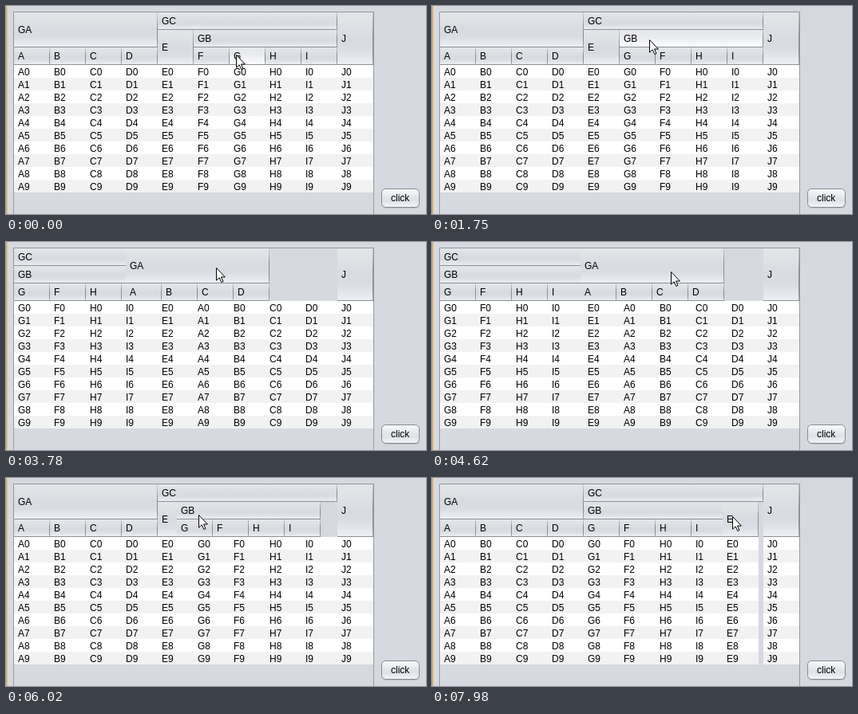
An HTML page for the animation above (8000 ms loop, 526 px wide and 261 px high).

```html
<!DOCTYPE html>
<html lang="en">
<head>
<meta charset="utf-8">
<title>Grouped table header</title>
<style>
html, body { margin: 0; width: 100%; height: 100%; overflow: hidden; background: #d6d9df; }
svg { display: block; }
text { font: 12px "Liberation Sans", Arial, sans-serif; fill: #000; white-space: pre; }
</style>
</head>
<body>
<svg width="526" height="261" viewBox="0 0 526 261">
  <defs>
    <linearGradient id="head" x2="0" y2="1">
      <stop offset="0" stop-color="#e3e5e9"/>
      <stop offset=".15" stop-color="#e1e3e7"/>
      <stop offset=".5" stop-color="#d8dbe1"/>
      <stop offset=".68" stop-color="#d9dce2"/>
      <stop offset="1" stop-color="#eef0f5"/>
    </linearGradient>
    <linearGradient id="hover" x2="0" y2="1">
      <stop offset="0" stop-color="#e6e8ec"/>
      <stop offset=".4" stop-color="#e9ebef"/>
      <stop offset="1" stop-color="#fdfdff"/>
    </linearGradient>
    <linearGradient id="edge" x2="0" y2="1">
      <stop offset="0" stop-color="#cbcdd3"/>
      <stop offset=".45" stop-color="#888c95"/>
      <stop offset=".8" stop-color="#888c95"/>
      <stop offset="1" stop-color="#a5a9b2"/>
    </linearGradient>
    <linearGradient id="button" x2="0" y2="1">
      <stop offset="0" stop-color="#fbfbfc"/>
      <stop offset=".5" stop-color="#e1e4e8"/>
      <stop offset=".65" stop-color="#dfe2e7"/>
      <stop offset="1" stop-color="#f4f6fa"/>
    </linearGradient>
    <pattern id="rows" y="74" width="45" height="32" patternUnits="userSpaceOnUse">
      <rect width="45" height="16" fill="#fff"/>
      <rect y="16" width="45" height="16" fill="#f2f2f2"/>
    </pattern>
  </defs>
  <rect width="526" height="261" fill="#d6d9df"/>
  <rect width="1.5" height="261" fill="#d9a862"/>
  <path d="M9.5 261V7.5H460.5V261" fill="none" stroke="#9297a1"/>
  <rect x="471" y="231" width="47" height="23" rx="5" fill="#b9bdc6"/>
  <rect x="470.5" y="229.5" width="47" height="23" rx="5" fill="url(#button)" stroke="#858a94"/>
  <text x="482" y="245">click</text>
  <g id="table"></g>
  <path id="cursor" d="M.5.5V16.2L4.2 12.8L6.8 18.5L9 17.5L6.5 12H11.4Z" fill="#fff" stroke="#000"/>
</svg>
<script>
const LOOP = 8000, TICK = 70, COL = 45, LEFT = 10, BOTTOM = 74;
const table = document.getElementById('table');
const cursor = document.getElementById('cursor');

// Pointer path: time, x, y
const path = [
  [0, 288, 61], [210, 288, 61], [350, 273, 60], [420, 273, 60], [910, 242, 61],
  [1260, 209, 78], [1330, 207, 76], [1400, 207, 76], [1750, 272, 42], [1890, 272, 42],
  [2450, 227, 40], [2730, 123, 36], [2940, 103, 36], [3150, 103, 36], [3220, 97, 36],
  [3290, 123, 36], [3500, 123, 36], [3780, 263, 32], [3920, 361, 32], [4130, 361, 32],
  [4340, 329, 36], [4550, 329, 36], [4970, 149, 44], [5180, 123, 45], [5390, 135, 46],
  [5670, 217, 48], [5740, 217, 48], [6020, 241, 46], [6160, 255, 46], [6440, 255, 46],
  [6860, 217, 46], [7070, 173, 46], [7140, 173, 46], [7210, 180, 47], [7490, 382, 54],
  [7630, 382, 54], [7840, 372, 50], [7980, 376, 48], [LOOP, 376, 48]
];

// Start, end, header, grab offset inside the header
const drags = [
  [280, 980, 'G', 8], [1960, 2450, 'GB', 37], [3570, 5180, 'GA', 113],
  [5810, 6860, 'GB', 27], [7700, LOOP, 'E', 12]
];

const hovers = [
  [0, 280, 'G'], [1540, 1680, 'E'], [1680, 1960, 'GB'], [3080, 3570, 'GA'],
  [5180, 5600, 'GA'], [5600, 5810, 'GB'], [7210, 7280, 'GA'], [7280, 7490, 'GB'],
  [7490, 7700, 'E']
];

const during = (list, t) => list.find(([from, to]) => t >= from && t < to);

function pointer(t) {
  const i = path.findIndex(p => p[0] > t);
  const [t0, x0, y0] = path[i - 1], [t1, x1, y1] = path[i];
  const k = (t - t0) / (t1 - t0);
  return [Math.round(x0 + (x1 - x0) * k), Math.round(y0 + (y1 - y0) * k)];
}

const group = (name, height, kids) => ({ name, height, kids });
const width = n => n.kids ? n.kids.reduce((w, k) => w + width(k), 0) : COL;
const leaf = name => ({ name });
const box = (x, y, w, h, fill) =>
  `<rect x="${x}" y="${y}" width="${w}" height="${h}" fill="${fill}"/>`;
const label = (x, y, s, fill = '#000') => `<text x="${x}" y="${y}" fill="${fill}">${s}</text>`;

function buildTree(t, drag, x) {
  const held = name => drag && drag[2] === name;
  const gFirst = held('G') ? x < 257.5 : t >= 980;
  const eLast = held('GB') ? x < 212.5 : t >= 2450;
  const gaAfter = held('GA') && x > 122;
  const gb = group('GB', 22, [...(gFirst ? 'GFHI' : 'FGHI')].map(leaf));
  const gc = group('GC', 22, eLast ? [gb, leaf('E')] : [leaf('E'), gb]);
  const ga = group('GA', 44, [...'ABCD'].map(leaf));
  return [...(gaAfter ? [gc, ga] : [ga, gc]), leaf('J')];
}

function column(name, x) {
  let s = box(x, BOTTOM, COL, 160, 'url(#rows)');
  for (let i = 0; i < 10; i++) s += label(x + 5, 87 + 16 * i, name + i);
  return s;
}

function draw(t) {
  const [px, py] = pointer(t);
  const drag = during(drags, t), hover = during(hovers, t);
  const dragX = drag ? px - drag[3] : 0;
  let still = '', floating = '';

  function header(node, x, y, lifted) {
    const { name, kids } = node, w = width(node), h = node.height || BOTTOM - y;
    const fill = hover && hover[2] === name ? 'url(#hover)' : 'url(#head)';
    let s = box(x, y, w, h, fill)
      + box(x, y + h - 1, w, 1, '#8b8f99')
      + box(x + w - 1, y, 1, h - 1, 'url(#edge)')
      + label(x + 5, y + h / 2 + 4, name, name === 'GA' && t >= 7210 ? '#47523f' : '#000');
    if (lifted) {
      if (kids) kids.forEach((k, i) => s += header(k, x + i * COL, y + h, true));
      return s;
    }
    still += s;
    if (kids) place(kids, x, y + h);
  }

  function place(nodes, x, y) {
    for (const n of nodes) {
      if (drag && drag[2] === n.name) {
        floating += header(n, dragX, y, true);
        if (n.kids) n.kids.forEach((k, i) => still += column(k.name, x + i * COL));
        else floating += column(n.name, dragX);
      } else {
        header(n, x, y);
        if (!n.kids) still += column(n.name, x);
      }
      x += width(n);
    }
  }

  place(buildTree(t, drag, dragX), LEFT, 8);
  table.innerHTML = still + floating;
  cursor.setAttribute('transform', `translate(${px} ${py})`);
}

const start = performance.now();
let last = -1;
function frame() {
  const now = Math.max(0, performance.now() - start) % LOOP;
  const t = Math.floor(now / TICK) * TICK;
  if (t !== last) draw(last = t);
  requestAnimationFrame(frame);
}
frame();
</script>
</body>
</html>
```
